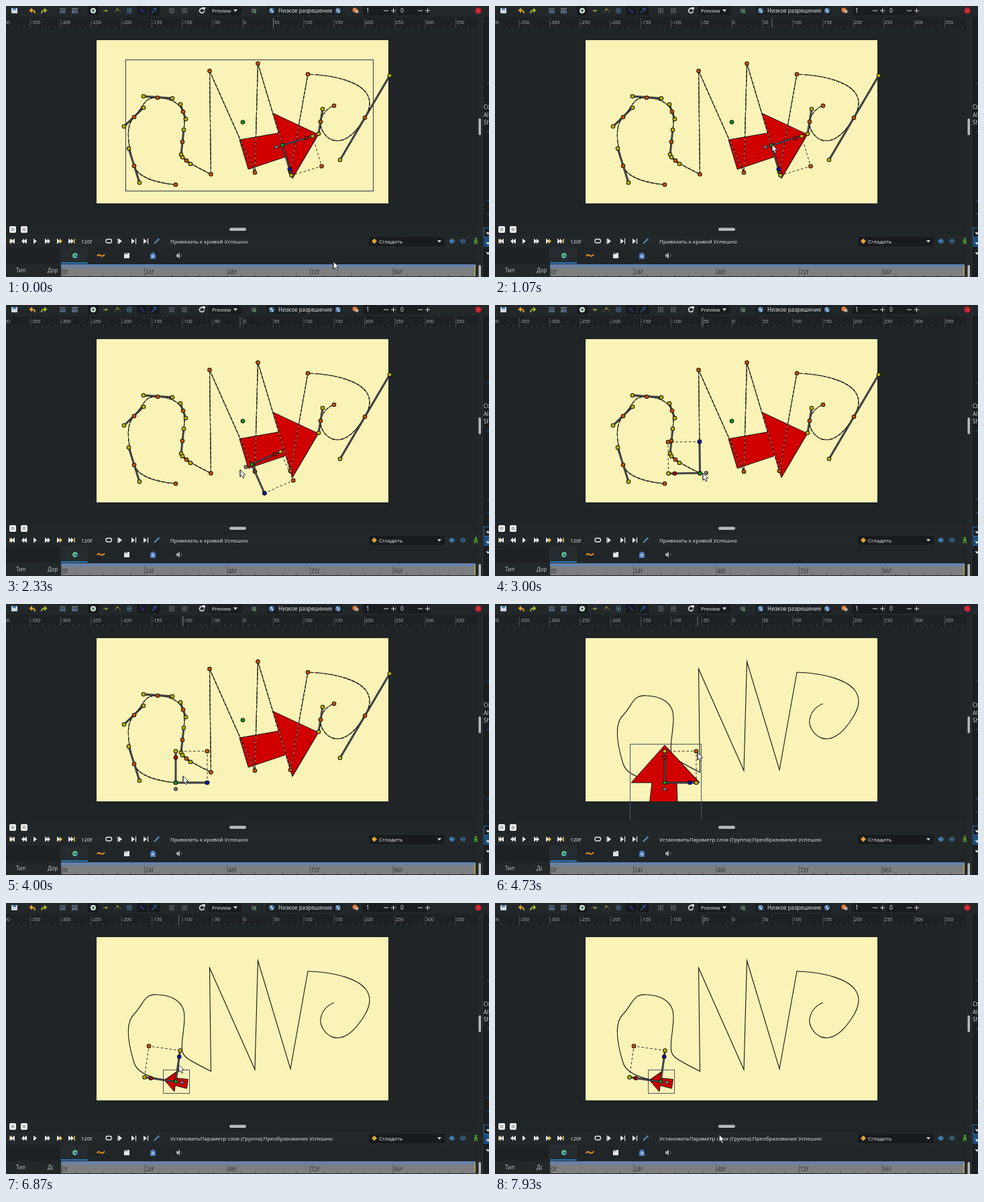
An HTML page with a canvas that plays this animation: 720x405 px, repeating every 8000 ms.

```html
<!DOCTYPE html>
<html lang="ru">
<head>
<meta charset="utf-8">
<title>Spline editor</title>
<style>
html, body { margin: 0; width: 100%; height: 100%; overflow: hidden; background: #1f2426; }
canvas { display: block; width: 720px; height: 405px; }
</style>
</head>
<body>
<canvas id="stage" width="720" height="405"></canvas>
<script>
const ctx = document.getElementById('stage').getContext('2d');
const LOOP = 8000, ARM = 47, TAU = Math.PI * 2;
const ORANGE = '#c8500e', YELLOW = '#b9b400', GREEN = '#0a9a1c', BLUE = '#0a14c0', RED = '#b00808';
const FONT = '"Noto Sans", "Open Sans", sans-serif';

// vertex x, y, then incoming and outgoing handles where it is smooth
const verts = [
  [253, 267], [191, 239, 199, 264, 183, 213], [191, 166, 176, 180, 205, 152],
  [226, 137, 205, 135, 248, 138], [264, 158, 260, 147, 268, 169],
  [263, 203, 265, 185, 261, 222], [269, 231, 263, 226, 275, 236],
  [305.5, 251.5], [303.5, 97], [371, 249], [375.5, 86], [424, 248], [450, 102],
  [535, 167, 572, 104, 498, 230], [469, 173, 466, 191, 472, 154], [489, 149]
];
const arrow = [[0, -56], [52, 0], [18, 0], [20, 59], [-26, 59], [-19, 0], [-50, 0]];

// ---- helpers ----
const clamp = u => Math.max(0, Math.min(1, u));
const ramp = (t, a, b) => clamp((t - a) / (b - a));
const ease = u => u * u * (3 - 2 * u);
const mix = (a, b, u) => a + (b - a) * u;

function rect(x, y, w, h, color) { ctx.fillStyle = color; ctx.fillRect(x, y, w, h); }

function frame(x, y, w, h, color) {
  ctx.strokeStyle = color;
  ctx.lineWidth = 1;
  ctx.strokeRect(x + .5, y + .5, w, h);
}

function line(pts, color, width = 1, dash = []) {
  ctx.beginPath();
  pts.forEach(p => ctx.lineTo(p[0], p[1]));
  ctx.strokeStyle = color;
  ctx.lineWidth = width;
  ctx.setLineDash(dash);
  ctx.stroke();
  ctx.setLineDash([]);
}

function poly(pts, color) {
  ctx.beginPath();
  pts.forEach(p => ctx.lineTo(p[0], p[1]));
  ctx.closePath();
  ctx.fillStyle = color;
  ctx.fill();
}

function disc(x, y, r, color) {
  ctx.beginPath();
  ctx.arc(x, y, r, 0, TAU);
  ctx.fillStyle = color;
  ctx.fill();
}

function ring(x, y, r, color, width = 1.3, from = 0, to = TAU) {
  ctx.beginPath();
  ctx.arc(x, y, r, from, to);
  ctx.strokeStyle = color;
  ctx.lineWidth = width;
  ctx.stroke();
}

function pill(x, y, w, h, r, color) {
  ctx.beginPath();
  ctx.roundRect(x, y, w, h, r);
  ctx.fillStyle = color;
  ctx.fill();
}

function text(s, x, y, size = 7.93, color = '#dfe2e3') {
  ctx.font = size + 'px ' + FONT;
  ctx.fillStyle = color;
  ctx.fillText(s, x, y);
}

function knob(x, y, color) {
  disc(x, y, 3.3, '#1a1608');
  disc(x, y, 2.3, color);
}

function arm(a, b) {
  line([a, b], '#16181c', 2.8);
  line([a, b], '#747a84', .9);
}

// ---- spline ----
const spline = new Path2D();
const samples = [];
verts.forEach((v, i) => {
  if (!i) return spline.moveTo(v[0], v[1]);
  const p = verts[i - 1];
  const c = [[p[0], p[1]], [p[4] ?? p[0], p[5] ?? p[1]], [v[2] ?? v[0], v[3] ?? v[1]], [v[0], v[1]]];
  spline.bezierCurveTo(...c[1], ...c[2], ...c[3]);
  for (let n = 0; n < 80; n++) {
    const u = n / 80, w = 1 - u;
    samples.push([0, 1].map(k =>
      w * w * w * c[0][k] + 3 * w * w * u * c[1][k] + 3 * w * u * u * c[2][k] + u * u * u * c[3][k]));
  }
});

// closest spot on the spline, with its direction
function snap(x, y) {
  let best = 0, min = Infinity;
  samples.forEach((p, i) => {
    const d = Math.hypot(p[0] - x, p[1] - y);
    if (d < min) { min = d; best = i; }
  });
  const p = samples[best], q = samples[best + 1] || p;
  return { x: p[0], y: p[1], a: best ? Math.atan2(q[1] - p[1], q[0] - p[0]) : 0 };
}

// ---- motion ----
const track = [
  [70, 488, 382], [330, 474, 352], [470, 474, 352], [950, 413, 207], [1150, 413, 207],
  [2250, 349, 246], [2400, 349, 246], [3670, 264, 257], [4200, 264, 257], [4700, 302, 222],
  [4800, 302, 222], [5900, 286, 244], [6000, 286, 244], [6300, 292, 269], [6730, 259, 231],
  [6800, 259, 231], [7000, 254, 268], [7330, 248, 268], [7600, 248, 268], [7930, 334, 346]
];
const START = { x: 412, y: 208, a: Math.atan2(162, 48.5) };
const TURN = -82 * Math.PI / 180;
const shrink = t => ease(ramp(t, 4800, 5900));
const sizeAt = t => 1 - .7 * shrink(t);
const turnAt = t => TURN * ease(ramp(t, 6300, 6730));

function cursorAt(t) {
  if (t > 6300 && t < 6730) {
    const a = turnAt(t);
    return [254 + 38 * Math.cos(a), 269 + 38 * Math.sin(a)];
  }
  const i = track.findIndex(k => k[0] > t);
  if (i === 0) return track[0].slice(1);
  if (i < 0) return track[track.length - 1].slice(1);
  const a = track[i - 1], b = track[i], u = ease(ramp(t, a[0], b[0]));
  return [mix(a[1], b[1], u), mix(a[2], b[2], u)];
}

// the ruler mark stays where the pointer left the work area
function markAt(t, [x, y]) {
  if (y < 325) return x;
  return t < 1000 ? 398.5 : 311;
}

function groupAt(t, cur) {
  if (t < 1200) return START;
  if (t < 4230) return snap(cur[0], cur[1]);
  return { x: mix(253, 247, ease(ramp(t, 7000, 7330))), y: 267, a: turnAt(t) };
}

const place = (g, s) => ([x, y]) => [
  g.x + s * (x * Math.cos(g.a) - y * Math.sin(g.a)),
  g.y + s * (x * Math.sin(g.a) + y * Math.cos(g.a))
];

// ---- scene ----
function drawArrow(g, s) {
  const pts = arrow.map(place(g, s));
  poly(pts, '#d00000');
  line([...pts, pts[0], pts[1]], '#161010', 1);
}

function drawBounds(g, s) {
  const pts = arrow.map(place(g, s));
  const xs = pts.map(p => p[0]), ys = pts.map(p => p[1]);
  const x = Math.round(Math.min(...xs) - 2.5), y = Math.round(Math.min(...ys) - 2.5);
  frame(x, y, Math.round(Math.max(...xs) + 2) - x, Math.round(Math.max(...ys) + 2) - y, '#505262');
}

function drawHandles() {
  ctx.strokeStyle = '#15150f';
  ctx.lineWidth = 1.1;
  ctx.stroke(spline);
  ctx.strokeStyle = '#a9a898';
  ctx.lineWidth = .9;
  ctx.setLineDash([3, 4]);
  ctx.stroke(spline);
  ctx.setLineDash([]);
  const smooth = verts.filter(v => v.length > 2);
  smooth.forEach(v => arm([v[2], v[3]], [v[4], v[5]]));
  smooth.forEach(v => { knob(v[2], v[3], YELLOW); knob(v[4], v[5], YELLOW); });
  verts.forEach(v => knob(v[0], v[1], ORANGE));
  knob(353, 173.5, GREEN);
}

function drawGizmo(g, corner, blue) {
  const at = place(g, ARM);
  const o = [g.x, g.y], px = at([1, 0]), py = at([0, -1]), pc = at([corner, -corner]);
  line([at([0, -corner]), pc, at([corner, 0])], '#2a2a22', 1, [3.5, 3]);
  arm(o, px);
  arm(o, py);
  const far = at([0, .2]);
  disc(far[0], far[1], 3, '#222');
  disc(far[0], far[1], 2, '#a39c94');
  line([[far[0] - 1.5, far[1] - 1.5], [far[0] + 1.5, far[1] + 1.5]], '#444', .8);
  line([[far[0] + 1.5, far[1] - 1.5], [far[0] - 1.5, far[1] + 1.5]], '#444', .8);
  knob(...pc, ORANGE);
  knob(...px, YELLOW);
  knob(...py, YELLOW);
  knob(...at([blue, 0]), BLUE);
  knob(...at([0, -.8]), RED);
  knob(...o, GREEN);
}

function drawCursor([x, y]) {
  const pts = [[0, 0], [0, 11], [2.5, 8.8], [4.4, 12.8], [6.2, 12], [4.4, 8], [7.8, 7.8]]
    .map(p => [x + p[0], y + p[1]]);
  poly(pts, '#fff');
  line([...pts, pts[0], pts[1]], '#23272b', .9);
}

// ---- window ----
function spinner(x, value) {
  pill(x - 5, 0, 48, 14, 2, '#191d1f');
  text(value, x, 10, 8.5);
  line([[x + 26, 7], [x + 33, 7]], '#d5d8d9');
  line([[x + 37, 7], [x + 44, 7]], '#d5d8d9');
  line([[x + 40.5, 3.5], [x + 40.5, 10.5]], '#d5d8d9');
}

// curved arrow pointing left (dir -1) or right (dir 1)
function bentArrow(x, dir, color) {
  poly([[x + 4.5 * dir, 6.5], [x, 2.5], [x, 10.5]], color);
  ctx.beginPath();
  ctx.moveTo(x + dir, 6.5);
  ctx.quadraticCurveTo(x - 4 * dir, 6, x - 4 * dir, 11);
  ctx.strokeStyle = color;
  ctx.lineWidth = 2;
  ctx.stroke();
}

function drawToolbar() {
  rect(0, 0, 720, 16, '#22272a');
  pill(8, 3, 9, 8, 1, '#cfd8e2');
  rect(10, 3, 5, 3, '#4d7faf');
  bentArrow(39, -1, '#dfa32a');
  bentArrow(57, 1, '#9fb52c');
  [84, 102].forEach((x, i) => {
    rect(x - 4, 3, 9, 8, i ? '#5f666d' : '#535a62');
    line([[x - 4, 6], [x + 5, 6]], '#2c3237');
    disc(x + 2, 9, 2, '#44608f');
  });
  [130, 203, 221].forEach(x => pill(x - 8, 0, 16, 14, 2, '#171b1d'));
  disc(130, 7, 4, '#dfe5e0');
  disc(130, 7, 2, '#3a7350');
  line([[144, 7], [153, 7]], '#5c6546', 1.3);
  disc(149, 7, 1.7, '#a39d30');
  line([[162, 10], [166, 4], [171, 9]], '#5e5b38', 1.2);
  disc(166, 5, 1.6, '#8f8a35');
  ring(184, 7, 3.3, '#446b8c', 1.3);
  disc(184, 7, 1.2, '#6f94b0');
  line([[200, 4], [206, 10]], '#3d2f7c', 2);
  line([[217, 11], [224, 3]], '#2f5496', 1.5);
  line([[219, 4], [224, 3], [223, 8]], '#2f5496');
  [247, 266].forEach(x => {
    for (let k = -3; k <= 3; k += 3) {
      line([[x + k, 3], [x + k, 11]], '#5b6268', 1);
      line([[x - 4, 7 + k], [x + 4, 7 + k]], '#5b6268', 1);
    }
  });
  ring(292, 7, 3.4, '#e8eaea', 1.6, .2, 5.3);
  poly([[292, 2], [297, 2], [296, 7]], '#e8eaea');
  pill(302, 0, 49, 14, 2, '#191d1f');
  text('Preview', 307, 10, 7.8);
  poly([[339, 5], [345, 5], [342, 9]], '#d5d8d9');
  rect(366, 4, 7, 6, '#525b59');
  disc(371, 9, 2, '#4c855f');
  pill(388, 0, 113, 14, 2, '#1b2023');
  [396, 495].forEach(x => {
    disc(x, 7, 4, '#4d79a8');
    rect(x - 2, 4, 2, 3, '#c2d0dd');
    rect(x, 7, 2, 3, '#c2d0dd');
  });
  text('Низкое разрешение', 406, 10, 8.05);
  disc(520, 6, 3.4, '#e17c38');
  disc(523, 8, 2.6, '#c4a79a');
  spinner(537, '1');
  spinner(588, '0');
  disc(704, 7, 5, '#8e2028');
  disc(704, 7, 3.6, '#d22b35');
}

function drawRuler(x) {
  rect(0, 17, 703, 16, '#1d2123');
  for (let n = -40; n <= 38; n++) {
    const tx = 353.3 + n * 9.06, big = n % 5 === 0;
    line([[tx, big ? 19 : 30], [tx, 33]], big ? '#555b5f' : '#43494c', .8);
    if (big) text(String(n * 10), tx + .8, 27, 7, '#a5abae');
  }
  line([[x, 18], [x, 33]], '#888e91', .8);
}

function transport(x, dir, second) {
  poly([[x - 3 * dir, 347.5], [x + 2 * dir, 351.5], [x - 3 * dir, 355.5]], '#e9ebeb');
  if (second) poly([[x + dir, 347.5], [x + 5 * dir, 351.5], [x + dir, 355.5]], second);
}

function drawPanels(late) {
  rect(0, 325, 710, 80, '#22272a');
  rect(0, 325, 703, 17, '#202527');
  pill(333, 331.5, 25, 4.5, 2.2, '#b7babb');
  [10, 27].forEach(x => {
    pill(x - 5, 329, 10, 10, 2, '#eceeee');
    ring(x, 334, 1.8, '#777', 1);
  });
  line([[6, 348], [6, 355]], '#e9c23c', 1.5);
  transport(10, -1, '#e9ebeb');
  transport(28, -1, '#e9ebeb');
  transport(44, 1);
  transport(61, 1, '#e9ebeb');
  transport(79, 1, '#e2b637');
  transport(96, 1, '#e9ebeb');
  line([[102, 348], [102, 355]], '#e9c23c', 1.5);
  text('120f', 112, 354.5);
  ctx.beginPath();
  ctx.roundRect(149, 348.5, 8.5, 5.5, 2.5);
  ctx.strokeStyle = '#e9ebeb';
  ctx.lineWidth = 1.3;
  ctx.stroke();
  [170, 189, 207].forEach((x, i) => {
    transport(x + 1, 1);
    const bx = i ? x + 4.5 : x - 3;
    line([[bx, 347.5], [bx, 355.5]], '#e9ebeb', 1.2);
  });
  line([[221, 355], [228, 348]], '#73a6cd', 1.7);
  disc(227, 349, 1.8, '#477aa4');
  text(late ? 'УстановитьПараметр слоя (Группа):Преобразование Успешно' : 'Привязать к кривой Успешно', 245, 354.5);

  pill(541, 345, 113, 14, 2, '#171b1d');
  poly([[545, 351.5], [549, 347.5], [553, 351.5], [549, 355.5]], '#e3a43b');
  text('Сгладить', 556, 354.5);
  poly([[643, 350], [649, 350], [646, 353.5]], '#d5d8d9');
  [664, 680].forEach((x, i) => {
    poly([[x - 4, 351.5], [x, 347.5], [x + 4, 351.5], [x, 355.5]], i ? '#315878' : '#3d7eb4');
    line([[x + 2, 348], [x + 5, 351.5], [x + 2, 355]], '#548fba', 1);
  });
  disc(700.5, 348, 1.6, '#55b52d');
  line([[698, 356], [700.5, 351.5], [703, 356]], '#55b52d', 1.5);
  line([[697, 351], [704, 351]], '#55b52d', 1.2);

  rect(0, 361, 80, 44, '#1d2123');
  rect(82, 361, 621, 24, '#202528');
  rect(82, 361, 40, 24, '#252b2e');
  rect(82, 383, 40, 2, '#2c79b8');
  disc(103, 373, 4, '#319b68');
  ring(103, 373, 3, '#a2d5bd', 1);
  disc(105, 374, 1.8, '#3769a5');
  ctx.beginPath();
  ctx.moveTo(136, 374);
  ctx.bezierCurveTo(139, 367, 142, 379, 147, 371);
  ctx.strokeStyle = '#e38d22';
  ctx.lineWidth = 2;
  ctx.stroke();
  rect(176, 369, 8, 8, '#e3e5e4');
  rect(176, 369, 5, 2, '#777d80');
  poly([[215, 371], [219, 368], [223, 371], [223, 378], [215, 378]], '#527fc0');
  disc(219, 374, 1.8, '#bdcce2');
  poly([[254, 371], [256, 371], [259, 368.5], [259, 377.5], [256, 375], [254, 375]], '#a5a9aa');
  ring(259, 373, 3, '#727a7d', 1, -.8, .8);

  rect(0, 385, 80, 20, '#22272a');
  text('Тип', 15, 397.5, 8, '#c0c5c7');
  ctx.save();
  ctx.beginPath();
  ctx.rect(55, 385, late ? 15.5 : 24, 20);
  ctx.clip();
  text('Дор', 62, 397.5, 8, '#c0c5c7');
  ctx.restore();

  rect(82, 386, 618, 18, '#7c7e80');
  rect(82, 386, 618, 4.5, '#6581ad');
  for (let n = 0; n < 120; n += 4) {
    const x = 83 + n * 5.145, big = n % 24 === 0;
    line([[x, big ? 391 : 401], [x, 404]], '#4a4d50', .8);
    if (big) text(n + 'f', x + 1, 400.5, 8.5, '#35383b');
  }
  rect(698.5, 388, 1.5, 16, '#b6aa45');
}

function check(y) {
  line([[716.5, y], [718.5, y + 2.5], [722, y - 2]], '#fff', 1.4);
}

function drawSide() {
  rect(703, 17, 7, 388, '#22272a');
  pill(704.5, 168, 3.5, 25, 1.7, '#b7babb');
  pill(704.5, 387, 3.5, 20, 1.7, '#b7babb');
  rect(710, 16, 10, 389, '#1a1e20');
  rect(710, 16, 1, 389, '#303639');
  ['Ct', 'Alt', 'Sh'].forEach((s, i) => text(s, 712, 154 + i * 11.5, 8, '#d5d8d9'));
  [115, 187, 290, 310].forEach(y => rect(717, y, 3, 1.5, '#29567c'));
  frame(712, 331, 10, 14, '#2c6fa8');
  rect(712, 346, 8, 14, '#1c4e7c');
  [338, 353, 368].forEach(check);
}

function draw(t) {
  const cur = cursorAt(t), g = groupAt(t, cur), late = t >= 4230;
  rect(0, 0, 720, 405, '#1f2426');
  rect(135, 51, 435, 244, '#faf3b7');

  ctx.save();
  ctx.beginPath();
  ctx.rect(135, 51, 435, 244);
  ctx.clip();
  ctx.strokeStyle = '#15150f';
  ctx.lineWidth = 1.1;
  ctx.stroke(spline);
  drawArrow(late ? g : START, sizeAt(t));
  ctx.restore();

  ctx.save();
  ctx.beginPath();
  ctx.rect(0, 33, 703, 291);
  ctx.clip();
  if (t < 700) frame(178, 80, 369, 196, '#34364a');
  if (late) drawBounds(g, sizeAt(t - 435));
  else drawHandles();
  const corner = t < 5960 ? 1 - .4 * shrink(t) : 1;
  drawGizmo(g, corner, t >= 1200 && !late ? 1 : .8);
  ctx.restore();

  drawToolbar();
  drawRuler(markAt(t, cur));
  drawPanels(late);
  drawSide();
  drawCursor(cur);
}

function tick() {
  draw(performance.now() % LOOP);
  requestAnimationFrame(tick);
}
tick();
</script>
</body>
</html>
```
